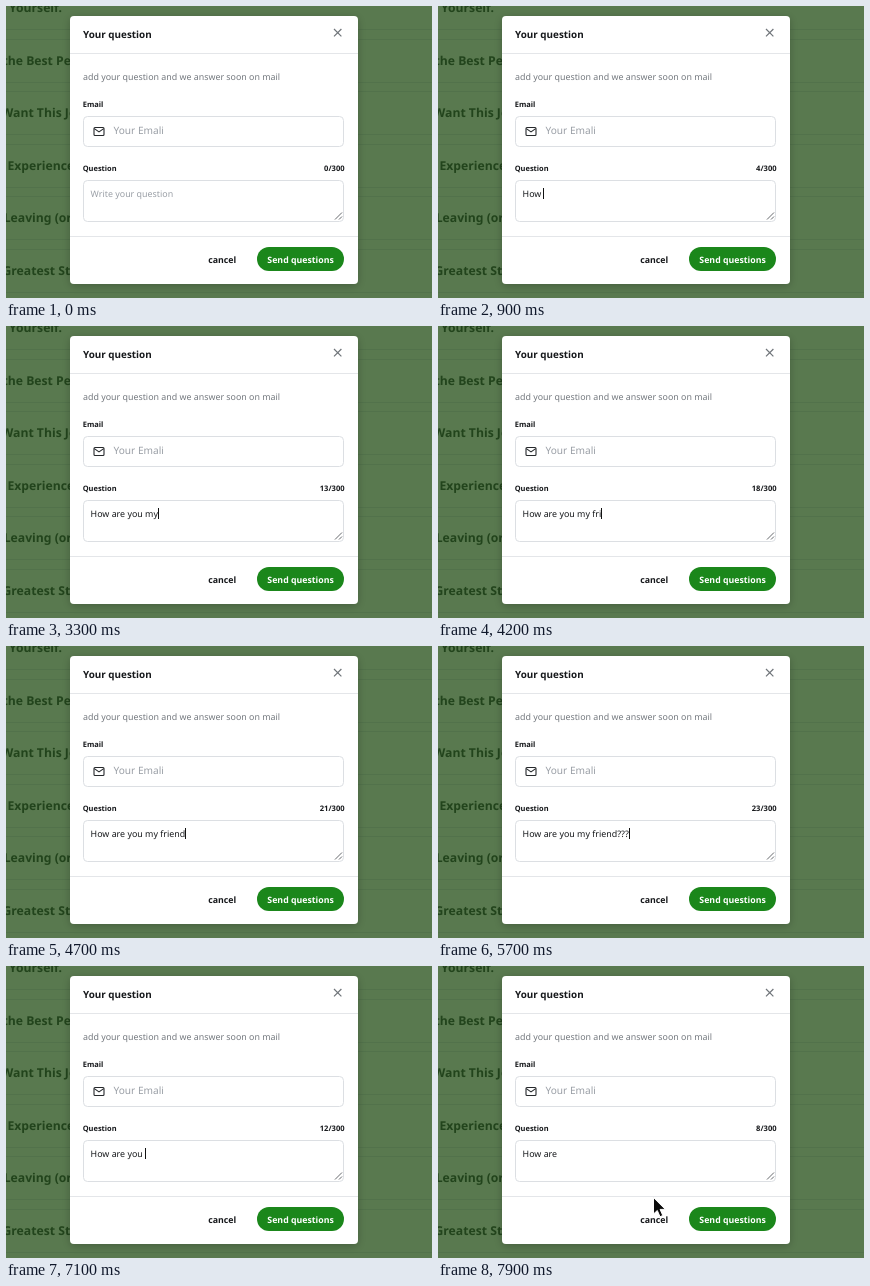
An HTML page that plays this animation: 426x292 px, repeating every 8000 ms.

```html
<!DOCTYPE html>
<html lang="en">
<head>
<meta charset="utf-8">
<title>Question dialog</title>
<style>
  html, body { margin: 0; width: 100%; height: 100%; overflow: hidden; background: #59794f; }
  svg { display: block; width: 426px; height: 292px; }
  text { font-family: "Noto Sans", "Open Sans", sans-serif; text-rendering: geometricPrecision; white-space: pre; }
  .bold { font-weight: 700; fill: #17191c; }
  .behind { font-weight: 700; font-size: 12.2px; fill: #22441c; }
  .box { fill: #fff; stroke: #dcdfe3; }
  .line { fill: none; stroke: #e4e6e9; }
</style>
</head>
<body>
<svg viewBox="0 0 426 292">
  <defs>
    <filter id="shadow" x="-10%" y="-10%" width="120%" height="120%">
      <feDropShadow dx="0" dy="2" stdDeviation="4" flood-color="#000" flood-opacity=".22"/>
    </filter>
  </defs>
  <rect width="426" height="292" fill="#59794f"/>
  <g id="rows"></g>

  <rect x="64" y="10" width="288" height="268" rx="4" fill="#fff" filter="url(#shadow)"/>
  <path class="line" d="M64 47.5H352M64 230.5H352"/>
  <text class="bold" x="77" y="31.8" font-size="9.9">Your question</text>
  <path d="M328 23l7.4 7.4M335.4 23l-7.4 7.4" stroke="#70757a" stroke-width="1.2"/>
  <text x="77" y="74" font-size="8.87" fill="#74797f">add your question and we answer soon on mail</text>

  <text class="bold" x="76.7" y="101" font-size="7.5">Email</text>
  <rect class="box" x="77.5" y="110.5" width="260" height="30" rx="4"/>
  <g fill="none" stroke="#26292c" stroke-width="1.1">
    <rect x="88" y="121.5" width="10" height="8" rx="1"/>
    <path d="M88.3 122.6l4.7 3.3 4.7-3.3"/>
  </g>
  <text x="107.5" y="128" font-size="10.15" fill="#9a9fa6">Your Emali</text>

  <text class="bold" x="76.7" y="165" font-size="7.45">Question</text>
  <text class="bold" id="count" x="338.6" y="165" font-size="7.6" text-anchor="end"></text>
  <rect class="box" x="77.5" y="174.5" width="260" height="41" rx="4"/>
  <path d="M329 213.5l7-7M333 213.5l3-3" stroke="#55595d" stroke-width=".9"/>
  <text id="typed" x="84.6" y="191" font-size="8.88"></text>
  <rect id="caret" y="182" width="1" height="11" fill="#111"/>

  <text class="bold" x="216.2" y="256.8" font-size="8.8" text-anchor="middle">cancel</text>
  <rect x="251" y="241" width="87" height="24" rx="12" fill="#1b871b"/>
  <text x="294.6" y="256.8" font-size="8.77" font-weight="700" fill="#fff" text-anchor="middle">Send questions</text>

  <path id="mouse" d="M.5 .6V17l3.8-3.5 2.7 6.2 2.8-1.2-2.7-6.1h5.2Z" fill="#0b0b0b" stroke="#fff" stroke-width="1" stroke-linejoin="round"/>
</svg>
<script>
  const LOOP = 8000, TICK = 100, BLINK = 500;
  const MESSAGE = "How are you my friend????";
  const LEFT = 84.6, SIZE = 8.88;
  const $ = id => document.getElementById(id);

  // Each key: tick, letters in the field, counter value
  const KEYS = `3 1 1,6 2 2,7 3 2,8 3 3,9 4 4,13 5 5,14 6 5,15 6 6,17 7 7,18 8 7,19 8 8,
    23 9 9,24 10 10,27 11 10,28 11 11,29 12 11,30 12 12,31 13 13,33 14 13,34 14 14,35 15 15,
    37 16 16,39 17 16,40 17 17,41 18 17,42 18 18,43 19 18,44 19 19,45 20 20,46 21 20,47 21 21,
    54 22 21,55 22 22,56 23 23,57 24 23,58 24 24,59 25 25,
    68 15 25,69 15 15,70 12 15,71 12 12,72 8 12,73 8 8`
    .split(",").map(key => key.trim().split(" ").map(Number));

  const ROWS = [["Yourself.", 3], ["the Best People", -3.5], ["Want This Job", -4.5],
    ["Experience", 1.5], ["Leaving (or", -2.3], ["Greatest Strength", -3.5]];
  $("rows").innerHTML = ROWS.map(([label, x], i) => {
    const y = 6.2 + i * 52.5;
    return `<rect x="-20" y="${Math.round(y - 26) + .5}" width="466" height="43" fill="none" stroke="#50704a" stroke-opacity=".7"/>
      <text class="behind" x="${x}" y="${y}">${label}</text>`;
  }).join("");

  const pen = document.createElement("canvas").getContext("2d");
  function widthOf(text) {
    pen.font = `${SIZE * 100}px "Noto Sans", "Open Sans", sans-serif`;
    return pen.measureText(text).width / 100;
  }

  function drawField(time) {
    let [last, letters, total] = [0, 0, 0];
    for (const key of KEYS) if (key[0] * TICK <= time) [last, letters, total] = key;
    const text = MESSAGE.slice(0, letters);
    $("typed").textContent = text || "Write your question";
    $("typed").setAttribute("fill", text ? "#17191c" : "#9a9fa6");
    $("count").textContent = total + "/300";
    const lit = letters > 0 && Math.floor((time - last * TICK) / BLINK) % 2 === 0;
    $("caret").setAttribute("visibility", lit ? "visible" : "hidden");
    $("caret").setAttribute("x", Math.round(LEFT + widthOf(text) - .2));
  }

  function drawMouse(time) {
    const tick = Math.floor(time / TICK);
    const p = Math.max(0, (tick - 76) / 3);
    const eased = 1 - (1 - p) ** 2;
    const x = 376 - 161 * eased, y = 84 + 147 * eased;
    $("mouse").setAttribute("visibility", tick >= 76 ? "visible" : "hidden");
    $("mouse").setAttribute("transform", `translate(${x} ${y})`);
  }

  function draw(time) {
    drawField(time);
    drawMouse(time);
  }

  const start = performance.now();
  function frame() {
    draw((performance.now() - start) % LOOP);
    requestAnimationFrame(frame);
  }
  frame();
</script>
</body>
</html>
```
